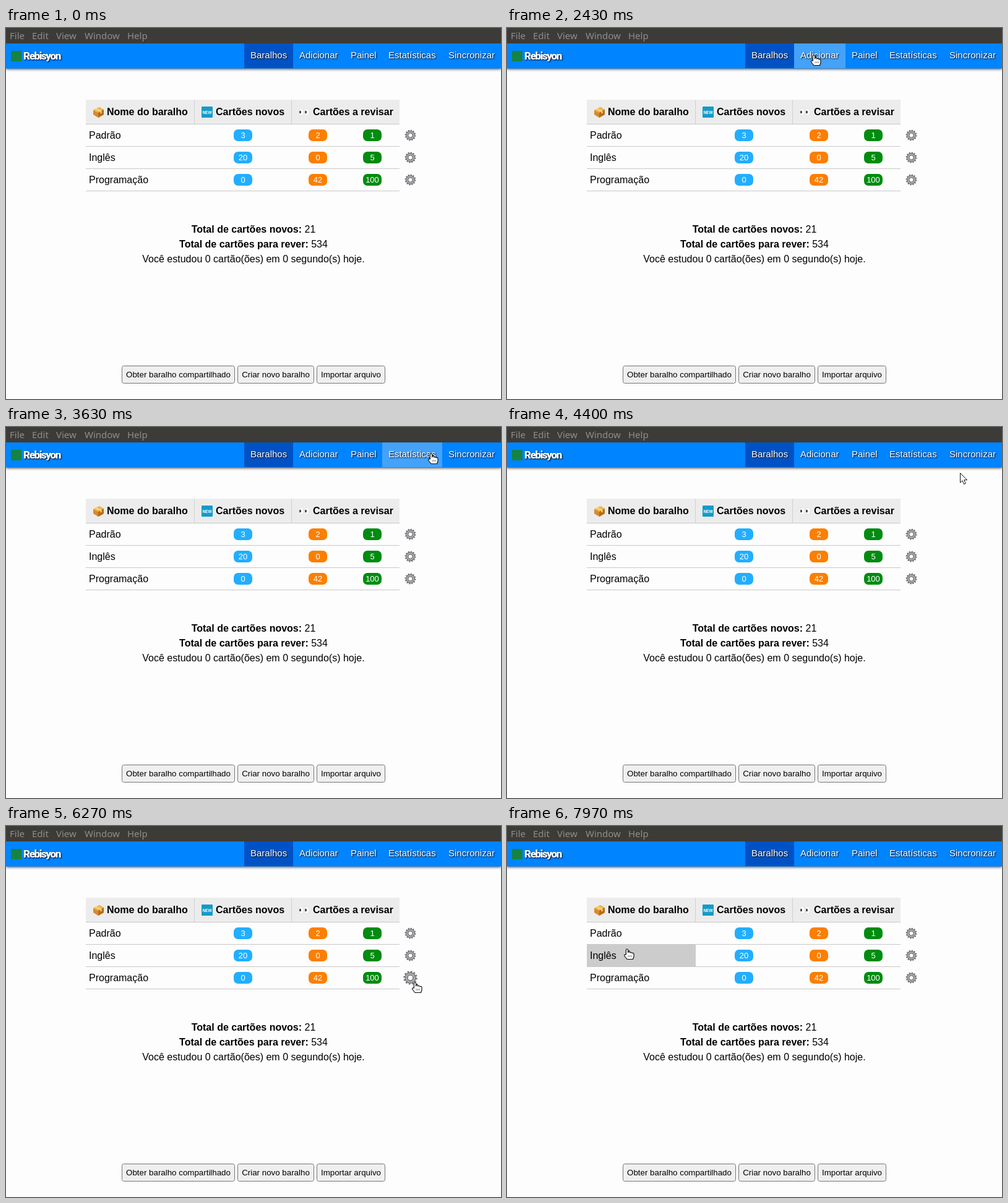
Write an HTML page that moves like this. It is 800 px wide and 600 px high and loops after 8000 ms.

```html
<!DOCTYPE html>
<html lang="pt">
<head>
<meta charset="utf-8">
<title>Baralhos</title>
<style>
  html, body { margin: 0; width: 100%; height: 100%; overflow: hidden; background: #fdfdfd; }
  svg { display: block; width: 800px; height: 600px; font: 16px "Liberation Sans", Arial, sans-serif; }
  .menu { font: 15px "Noto Sans", sans-serif; fill: #8f8e8a; }
  .nav { font-size: 15px; fill: #fff; text-shadow: 1px 1px 2px #000; }
  .brand { font: 900 17px Roboto, sans-serif; letter-spacing: -1.4px; fill: #fff; text-shadow: 1px 1px 2px #000; }
  .bar { filter: drop-shadow(0 1px 2px #444); }
  .bold { font-weight: bold; }
  .mid { text-anchor: middle; }
  .badge { font-size: 13px; fill: #fff; text-anchor: middle; }
  .button { font-size: 13.333px; text-anchor: middle; }
</style>
</head>
<body>
<svg viewBox="0 0 800 600">
  <defs>
    <g id="gear" fill="none">
      <circle r="7.7" stroke="#77777a" stroke-width="2.6" stroke-dasharray="2.016"/>
      <circle r="5.2" stroke="#6c6c70" stroke-width="4.4"/>
      <circle r="5.3" stroke="#a9a9ae" stroke-width="2.4"/>
    </g>
  </defs>
  <rect width="800" height="600" fill="#fdfdfd"/>
  <g class="bar"><rect y="20" width="800" height="45.5" fill="#0084ff"/></g>
  <rect width="800" height="25" fill="#3c3b37"/>
  <g id="menu" class="menu"></g>
  <rect x="8" y="37" width="17" height="17" fill="#168344"/>
  <text class="brand" x="28" y="51">Rebisyon</text>
  <g id="nav"></g>

  <rect x="129" y="116" width="507" height="39" fill="#ececec"/>
  <path d="M304.5 116V155M461.5 116V155" stroke="#d0d0d0"/>
  <rect id="deckHover" x="129" width="176" height="35" fill="#ccc"/>
  <path d="M129 155.5H636M129 191.5H636M129 227.5H636M129 263.5H636" stroke="#c8c8c8"/>

  <g transform="translate(140 127)">
    <path d="M1 6L11 1 18 5V13L9 18 1 13Z" fill="#d88a2a"/>
    <path d="M1 6L11 1 18 5 9 10Z" fill="#f2b84d"/>
    <path d="M9 10L18 5V13L9 18Z" fill="#b96b18"/>
    <path d="M5 3.8L13.5 7.8V11" fill="none" stroke="#f6dc91" stroke-width="2"/>
  </g>
  <rect x="316" y="127" width="18" height="18" rx="1" fill="#159bc8"/>
  <text class="bold mid" x="325" y="138.5" fill="#fff" style="font-size:6.5px">NEW</text>
  <g stroke="#d5d5d5" stroke-width=".6">
    <ellipse cx="477" cy="136" rx="4" ry="5.5" fill="#fff"/>
    <ellipse cx="486" cy="136" rx="4" ry="5.5" fill="#fff"/>
    <path d="M475.5 135v2M484.5 135v2" stroke="#333" stroke-width="2.6" stroke-linecap="round"/>
  </g>
  <g class="bold">
    <text x="163" y="141">Nome do baralho</text>
    <text x="339" y="141">Cartões novos</text>
    <text x="496" y="141">Cartões a revisar</text>
  </g>
  <g id="rows"></g>

  <g class="mid">
    <text x="400" y="331"><tspan class="bold">Total de cartões novos:</tspan> 21</text>
    <text x="400" y="355"><tspan class="bold">Total de cartões para rever:</tspan> 534</text>
    <text x="400" y="379">Você estudou 0 cartão(ões) em 0 segundo(s) hoje.</text>
  </g>
  <g id="buttons"></g>

  <g id="cursor" stroke-linejoin="round">
    <path id="arrow" d="M.5 .5V16L4 12.7 6.5 18.5 9.2 17.3 6.7 11.7H11.5Z" fill="#fff" stroke="#111"/>
    <g id="hand">
      <path d="M-1.6 9V1.4Q-1.4 0 0 0T1.6 1.4V5.8Q4-.2 4.6 6 7.3 4.6 7.9 6.7 10.8 5.6 11 8.4V12.3L9.5 16.5H0L-4.3 11Q-5 8.4-1.6 9Z" fill="#fff" stroke="#111" stroke-width="1.2"/>
      <path d="M2.2 10v3M4.7 10v3M7.2 10v3" stroke="#555" stroke-width=".8"/>
    </g>
  </g>
</svg>
<script>
const $ = id => document.getElementById(id);
const LOOP = 8000;

const menu = [["File", 6], ["Edit", 42], ["View", 81], ["Window", 127], ["Help", 196]];
const tabs = [["Baralhos", 385, 464], ["Adicionar", 464, 547], ["Painel", 547, 608],
  ["Estatísticas", 608, 705], ["Sincronizar", 705, 800]];
const decks = [["Padrão", 3, 2, 1], ["Inglês", 20, 0, 5], ["Programação", 0, 42, 100]];
const badges = [[383, "#22aeff"], [504, "#fb7f00"], [592, "#008c10"]];
const buttons = [["Obter baralho compartilhado", 187, 370], ["Criar novo baralho", 374, 498],
  ["Importar arquivo", 502, 613]];
const rowY = i => 173.5 + 36 * i;

$("menu").innerHTML = menu.map(([label, x]) => `<text x="${x}" y="18">${label}</text>`).join("");

$("nav").innerHTML = tabs.map(([label, left, right], i) =>
  `<rect class="tab" x="${left}" y="25" width="${right - left}" height="40" fill="${i ? "#44a2fb" : "#0052c4"}"/>
   <text class="nav" x="${left + 10}" y="49">${label}</text>`).join("");

$("rows").innerHTML = decks.map(([name, ...counts], i) => {
  const y = rowY(i);
  const pills = counts.map((count, k) => {
    const [x, color] = badges[k];
    return `<rect x="${x - 15}" y="${y - 9.5}" width="30" height="19" rx="7" fill="${color}"/>
      <text class="badge" x="${x}" y="${y + 4.5}">${count}</text>`;
  }).join("");
  return `<text x="134" y="${y + 5.5}">${name}</text>${pills}<use class="gear" href="#gear"/>`;
}).join("");

$("buttons").innerHTML = buttons.map(([label, left, right]) =>
  `<rect x="${left + .5}" y="546.5" width="${right - left - 1}" height="28" rx="3" fill="#efefef" stroke="#767676"/>
   <text class="button" x="${(left + right) / 2}" y="565">${label}</text>`).join("");

const tabRects = document.querySelectorAll(".tab");
const gears = document.querySelectorAll(".gear");

// Pointer waypoints: time, x, y
const path = [
  [850, -16, 76], [1230, 110, 51], [1700, 150, 52], [2300, 480, 45], [2430, 496, 44],
  [2700, 535, 44], [3130, 590, 44], [3270, 600, 44], [3630, 687, 43], [4000, 755, 45],
  [4250, 750, 50], [4870, 656, 170], [5070, 652, 174], [5350, 657, 180], [5700, 655, 210],
  [6050, 655, 244], [6270, 661, 253], [6600, 674, 272], [7000, 525, 292], [7400, 305, 260],
  [7700, 230, 238], [7970, 194, 199], [8000, 194, 199]
];

function pointerAt(time) {
  const i = path.findIndex(point => point[0] > time);
  if (i < 1) return [-50, -50];
  const [t0, x0, y0] = path[i - 1], [t1, x1, y1] = path[i];
  const u = (time - t0) / (t1 - t0), s = (u + u * u * (3 - 2 * u)) / 2;
  return [x0 + (x1 - x0) * s, y0 + (y1 - y0) * s];
}

function draw() {
  const [x, y] = pointerAt(performance.now() % LOOP);
  const tab = y >= 25 && y < 65 ? tabs.findIndex(([, left, right]) => x >= left && x < right) : -1;
  const deck = x >= 129 && x < 305 && y >= 156 && y < 264 ? Math.floor((y - 156) / 36) : -1;
  const gear = decks.findIndex((_, i) => Math.abs(x - 653.5) < 11 && Math.abs(y - rowY(i)) < 11);

  tabRects.forEach((rect, i) => rect.style.display = i === 0 || i === tab ? "" : "none");
  gears.forEach((node, i) => node.setAttribute("transform",
    `translate(653.5 ${rowY(i)}) scale(${i === gear ? 1.25 : 1})`));
  $("deckHover").style.display = deck < 0 ? "none" : "";
  $("deckHover").setAttribute("y", 156 + 36 * Math.max(deck, 0));

  const pointing = tab >= 0 || deck >= 0 || gear >= 0;
  $("hand").style.display = pointing ? "" : "none";
  $("arrow").style.display = pointing ? "none" : "";
  $("cursor").setAttribute("transform", `translate(${Math.round(x)} ${Math.round(y)})`);
  requestAnimationFrame(draw);
}
draw();
</script>
</body>
</html>
```
